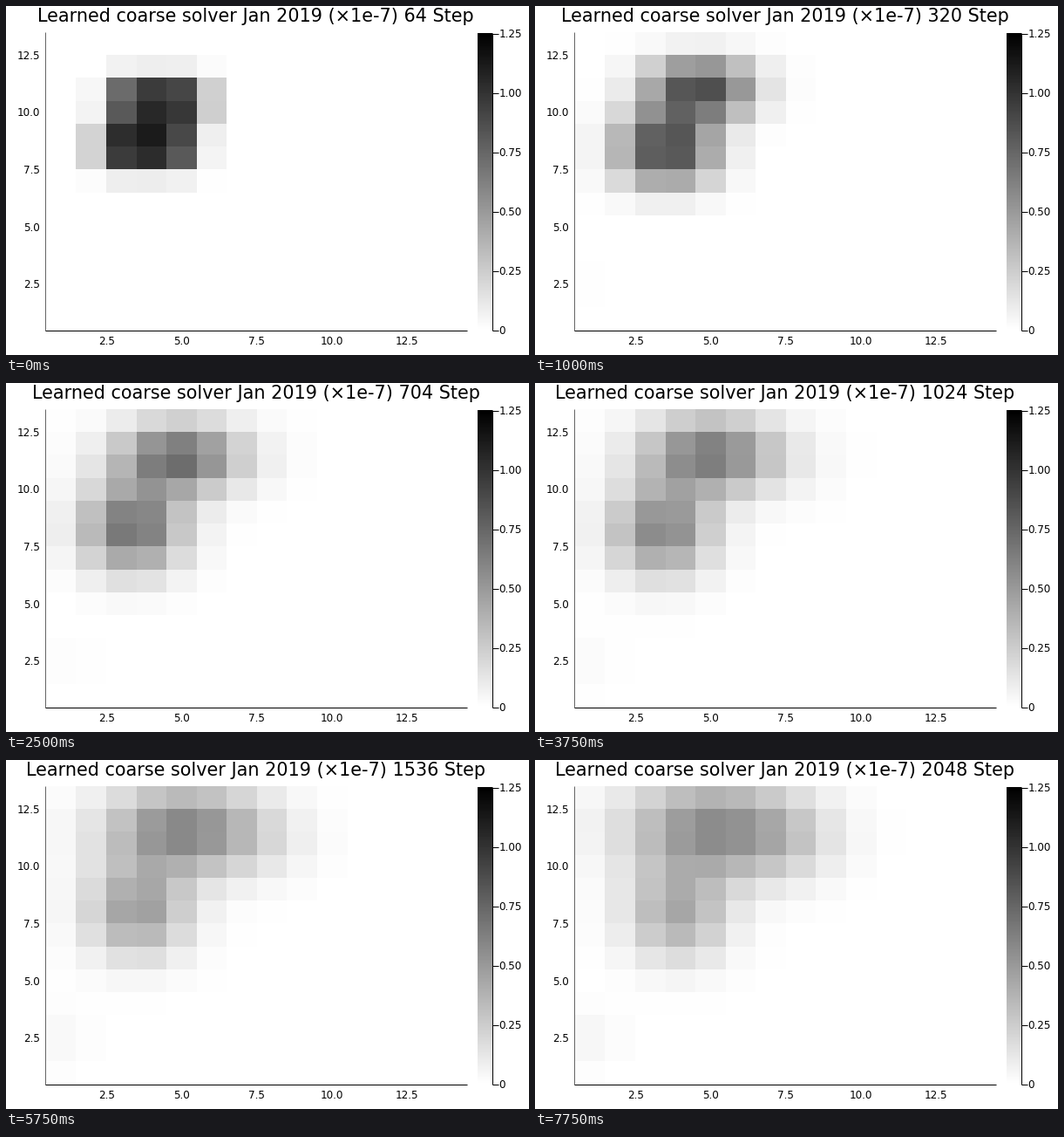
Animation of 600x400 px, one loop 8000 ms. Source, as a matplotlib script:

```python
import numpy as np
import matplotlib.pyplot as plt
from matplotlib.animation import FuncAnimation

W, H, DPI = 600, 400, 100
FRAMES, INTERVAL = 32, 250
COLS, ROWS = 14, 13
LEFT, RIGHT, TOP, BOTTOM = 46.2, 529.2, 30.25, 371.25

plt.rcParams["font.family"] = "DejaVu Sans"

X = np.arange(1, COLS + 1)[None, :]
Y = np.arange(ROWS, 0, -1)[:, None]


def blob(amp, x, y, wx, wy, power=2):
    return amp * np.exp(-np.abs((X - x) / wx) ** power
                        - np.abs((Y - y) / wy) ** power)


def density(i):
    """A solid block that splits in two and smears out."""
    def settle(start, end, tau):
        return end + (start - end) * np.exp(-i / tau)

    late = i / (FRAMES - 1)
    power = settle(4, 2, 2)
    upper = blob(settle(.79, .42, 12), settle(4.2, 5, 5), settle(10.5, 11.6, 6),
                 1.65 + .035 * i, 1.2 + .03 * i, power)
    lower = blob(settle(.85, .24, 16), settle(3.85, 3.3, 5) + .6 * late ** 3,
                 8.5 - .02 * i, 1.65, settle(1.2, 2, 5), power)
    tail = blob(.12 * late ** 2, 7.5, 11.2, 1.8, 1.8)
    haze = blob(.04 * late, 1, 2.5, 1, 1.3)
    return upper + lower + tail + haze


fig = plt.figure(figsize=(W / DPI, H / DPI), dpi=DPI, facecolor="white")
ax = fig.add_axes([0, 0, 1, 1])
ax.axis("off")


def label(x, y, text, px=12, **kw):
    return ax.text(x, y, text, fontsize=px * 72 / DPI, va="baseline", **kw)


def line(xs, ys, color="black"):
    ax.plot(xs, ys, color=color, lw=72 / DPI, solid_capstyle="butt")


def shade(data, extent):
    return ax.imshow(data, cmap="gray_r", vmin=0, vmax=1, extent=extent,
                     aspect="auto", interpolation="nearest")


heat = shade(density(0), (LEFT, RIGHT, BOTTOM, TOP))
shade(np.linspace(1, 0, 256)[:, None], (541, 558, 371, 31))

line([45.2, 45.2], [30, 372], "0.4")
line([45, 529], [371.8, 371.8])
for v in np.arange(2.5, 13, 2.5):
    label(LEFT + (v - .5) * (RIGHT - LEFT) / COLS, 387.5, f"{v}", ha="center")
    label(38.7, BOTTOM - (v - .5) * (BOTTOM - TOP) / ROWS + 4.4, f"{v}", ha="right")

line([558.2, 558.2], [31, 372])
for k in range(6):
    y = 371.8 - 68 * k
    line([558, 565], [y, y])
    label(565.7, y + 3.7, f"{k / 4:.2f}" if k else "0", ha="left")

title = label(286.6, 18.5, "", 20.8, ha="center")
ax.set_xlim(0, W)
ax.set_ylim(H, 0)


def draw(i):
    heat.set_data(density(i))
    title.set_text(f"Learned coarse solver Jan 2019 (×1e-7) {64 * (i + 1)} Step")
    return heat, title


anim = FuncAnimation(fig, draw, frames=FRAMES, interval=INTERVAL,
                     repeat=True, repeat_delay=0)
plt.show()
```
